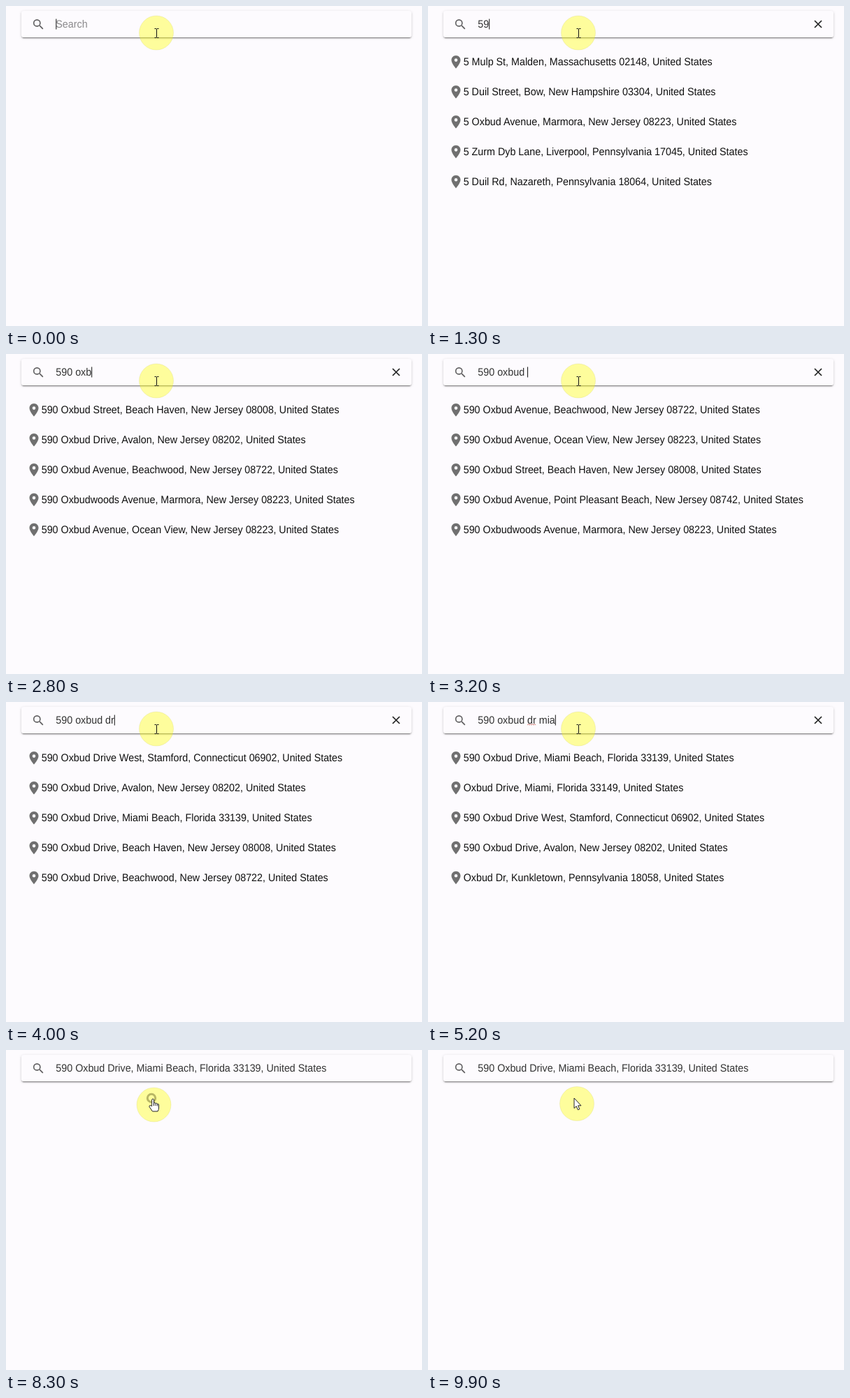
Recreate the animation shown at these times as an HTML page. Size 595x459 px, loop 10 s.

```html
<!DOCTYPE html>
<html lang="en">
<head>
<meta charset="utf-8">
<title>Address search</title>
<style>
  html, body { margin: 0; width: 100%; height: 100%; overflow: hidden; background: #fdfbfe; }
  .bar {
    position: absolute; left: 22px; top: 7px; width: 557.5px; height: 37.5px;
    border-radius: 3px; background: #fdfbfe;
    box-shadow: 0 3px 1px -2px rgba(0,0,0,.3), 0 1.5px 1.5px rgba(0,0,0,.2), 0 1px 4px rgba(0,0,0,.13);
  }
  svg { position: absolute; left: 0; top: 0; }
  text {
    font: 14.3px "Liberation Sans", Arial, sans-serif;
    text-rendering: geometricPrecision; white-space: pre; fill: #111;
  }
  #query { fill: #333; }
  #hint { fill: #8b8a8c; }
  .squiggle { fill: none; stroke: #c9685f; stroke-width: .9; }
</style>
</head>
<body>
<div class="bar"></div>
<svg width="595" height="459" viewBox="0 0 595 459">
  <defs>
    <path id="pin" fill="#707070" transform="scale(.93)" d="M0-10c-3.87 0-7 3.13-7 7 0 5.25 7 13 7 13s7-7.75 7-13c0-3.87-3.13-7-7-7zm0 9.5a2.5 2.5 0 0 1 0-5 2.5 2.5 0 0 1 0 5z"/>
  </defs>
  <path fill="#626163" transform="translate(36.4 16.5) scale(.83)" d="M15.5 14h-.79l-.28-.27A6.47 6.47 0 0 0 16 9.5 6.5 6.5 0 1 0 9.5 16c1.61 0 3.09-.59 4.23-1.57l.27.28v.79l5 4.99L20.49 19l-4.99-5zm-6 0a4.5 4.5 0 1 1 0-9 4.5 4.5 0 0 1 0 9z"/>
  <text id="hint" transform="translate(71.3 31) scale(1 1.07)">Search</text>
  <text id="query" transform="translate(71.3 31) scale(1 1.07)"></text>
  <path class="squiggle" id="wave1"/>
  <path class="squiggle" id="wave2"/>
  <rect id="caret" y="18.5" width="1" height="15" fill="#111"/>
  <path id="clear" d="M553 21l10 10m0-10l-10 10" stroke="#222" stroke-width="1.7"/>
  <g id="list"></g>
  <circle id="halo" r="24.5" fill="#ff0" fill-opacity=".39" stroke="#cc6" stroke-opacity=".3" stroke-width=".8"/>
  <circle id="ring" cx="208" cy="69" fill="none" stroke="#b9b765" stroke-width="3"/>
  <g id="pointer" stroke-linejoin="round">
    <path id="beam" d="M-2.5-6H-.3L.5-5.4l.8-.6H3.5M.5-5.5V6.5M-2.5 7H-.3L.5 6.4l.8.6H3.5" fill="none" stroke="#111"/>
    <path id="hand" d="M-2.8 2V-7.5Q-1.4-9.5 0-7.5V-2.5Q1.5-3.5 2.7-2Q4-2.8 5.2-1.2Q7-1.5 7 .5V4.5Q7 7 5.5 9.5H-2L-6.6 2.8Q-6.5 .5-4.6 1.2ZM0-2.5V1.5M2.7-2V1.5M5.2-1.2V2" fill="#fff" stroke="#222"/>
    <path id="arrow" d="M-4-8V6.5L-.8 3.6L1.4 8.8L3.8 7.8L1.6 2.8H6Z" fill="#fff" stroke="#222"/>
  </g>
</svg>
<script>
const $ = id => document.getElementById(id);
const LOOP = 10000, LEFT = 71.3, CLICK = 8100, PICK = 8200, LEAVE = 8400;
const FULL = "590 oxbud dr miami";
const PICKED = "590 Oxbud Drive, Miami Beach, Florida 33139";

// Time of each keystroke of FULL
const keys = [1000, 1300, 1700, 2200, 2400, 2600, 2800, 2900, 3000, 3200,
  3500, 3900, 4400, 4700, 4800, 5000, 5900, 6000];

const results = [
  [1000, [
    "5 Mulp St, Malden, Massachusetts 02148",
    "5 Duil Street, Bow, New Hampshire 03304",
    "5 Oxbud Avenue, Marmora, New Jersey 08223",
    "5 Zurm Dyb Lane, Liverpool, Pennsylvania 17045",
    "5 Duil Rd, Nazareth, Pennsylvania 18064"]],
  [1400, [
    "59 Duil Street, Bow, New Hampshire 03304",
    "59 Mulp St, Malden, Massachusetts 02148",
    "59 Place, Johnstown, Pennsylvania 15902",
    "59 Duil Rd, Nazareth, Pennsylvania 18064",
    "59 Zurm Dyb Lane, Liverpool, Pennsylvania 17045"]],
  [1800, [
    "590 a Duil Street, Bow, New Hampshire 03304",
    "-590a Duil Rd, Nazareth, Pennsylvania 18064",
    "590 Place, Johnstown, Pennsylvania 15902",
    "Zurm Dyb Lane, Liverpool, Pennsylvania 17045",
    "590 Mulp St, Malden, Massachusetts 02148"]],
  [2500, [
    "590 Oxbud Street, Beach Haven, New Jersey 08008",
    "590 Oxbud Drive, Avalon, New Jersey 08202",
    "590 Oxbud Avenue, Beachwood, New Jersey 08722",
    "590 Oxbudwoods Avenue, Marmora, New Jersey 08223",
    "590 Oxbud Avenue, Ocean View, New Jersey 08223"]],
  [3000, [
    "590 Oxbud Avenue, Beachwood, New Jersey 08722",
    "590 Oxbud Avenue, Ocean View, New Jersey 08223",
    "590 Oxbud Street, Beach Haven, New Jersey 08008",
    "590 Oxbud Avenue, Point Pleasant Beach, New Jersey 08742",
    "590 Oxbudwoods Avenue, Marmora, New Jersey 08223"]],
  [3600, [
    "590 Oxbud Drive, Avalon, New Jersey 08202",
    PICKED,
    "590 Oxbud Drive, Beachwood, New Jersey 08722",
    "590 Oxbud Drive West, Stamford, Connecticut 06902",
    "590 Oxbud Drive, Marmora, New Jersey 08223"]],
  [4000, [
    "590 Oxbud Drive West, Stamford, Connecticut 06902",
    "590 Oxbud Drive, Avalon, New Jersey 08202",
    PICKED,
    "590 Oxbud Drive, Beach Haven, New Jersey 08008",
    "590 Oxbud Drive, Beachwood, New Jersey 08722"]],
  [5100, [
    PICKED,
    "Oxbud Drive, Miami, Florida 33149",
    "590 Oxbud Drive West, Stamford, Connecticut 06902",
    "590 Oxbud Drive, Avalon, New Jersey 08202",
    "Oxbud Dr, Kunkletown, Pennsylvania 18058"]],
];

const country = s => s + ", United States";
const show = (el, on) => el.style.display = on ? "" : "none";
const setText = (el, s) => { if (el.textContent !== s) el.textContent = s; };

function make(tag, attrs, parent) {
  const el = document.createElementNS("http://www.w3.org/2000/svg", tag);
  for (const name in attrs) el.setAttribute(name, attrs[name]);
  return parent.appendChild(el);
}

const rows = Array.from({ length: 5 }, (_, i) => {
  const y = i * 42.9;
  make("use", { href: "#pin", transform: `translate(40 ${80.4 + y})` }, $("list"));
  return make("text", { transform: `translate(50.7 ${85.2 + y}) scale(1 1.07)` }, $("list"));
});

function squiggle(el, on, start, count) {
  show(el, on);
  if (!on) return;
  const from = LEFT + $("query").getSubStringLength(0, start);
  const to = from + $("query").getSubStringLength(start, count);
  let d = `M${from} 33`;
  for (let x = from + 1.5, up = true; x < to; x += 1.5, up = !up) d += `L${x} ${up ? 31.7 : 33}`;
  el.setAttribute("d", d);
}

function drawInput(t) {
  const typed = keys.filter(k => k <= t).length, picked = t >= PICK;
  setText($("query"), picked ? country(PICKED) : FULL.slice(0, typed));
  show($("hint"), !typed);
  show($("clear"), typed && !picked);
  const since = t - (typed ? keys[typed - 1] : -200);
  show($("caret"), t < CLICK && since % 1000 < 500);
  $("caret").setAttribute("x", LEFT + (typed ? $("query").getComputedTextLength() : 0));
  squiggle($("wave1"), t >= 4400 && !picked, 10, 2);
  squiggle($("wave2"), t >= 6000 && !picked, 13, 5);
}

function drawList(t) {
  const current = results.filter(r => r[0] <= t).pop();
  const open = current && t < PICK;
  show($("list"), open);
  if (open) rows.forEach((row, i) => setText(row, country(current[1][i])));
}

function drawPointer(t) {
  const p = Math.min(1, Math.max(0, (t - 7500) / 500)), ease = p * p * (3 - 2 * p);
  const left = t >= LEAVE;
  const x = left ? 213 : 215 - 3.5 * ease, y = left ? 77 : 38.5 + 40 * ease;
  const at = `translate(${x} ${y})`;
  $("halo").setAttribute("transform", at);
  $("pointer").setAttribute("transform", at);
  const shape = left ? "arrow" : y < 46 ? "beam" : y < 60 ? "arrow" : "hand";
  for (const id of ["beam", "hand", "arrow"]) show($(id), id === shape);
  show($("ring"), t >= CLICK && t < LEAVE + 100);
  $("ring").setAttribute("r", Math.min(5.7, 2 + Math.max(0, t - CLICK) / 54));
  $("ring").setAttribute("opacity", left ? .4 : 1);
}

const begin = performance.now();
function frame() {
  const t = (performance.now() - begin) % LOOP;
  drawInput(t);
  drawList(t);
  drawPointer(t);
  requestAnimationFrame(frame);
}
frame();
</script>
</body>
</html>
```
